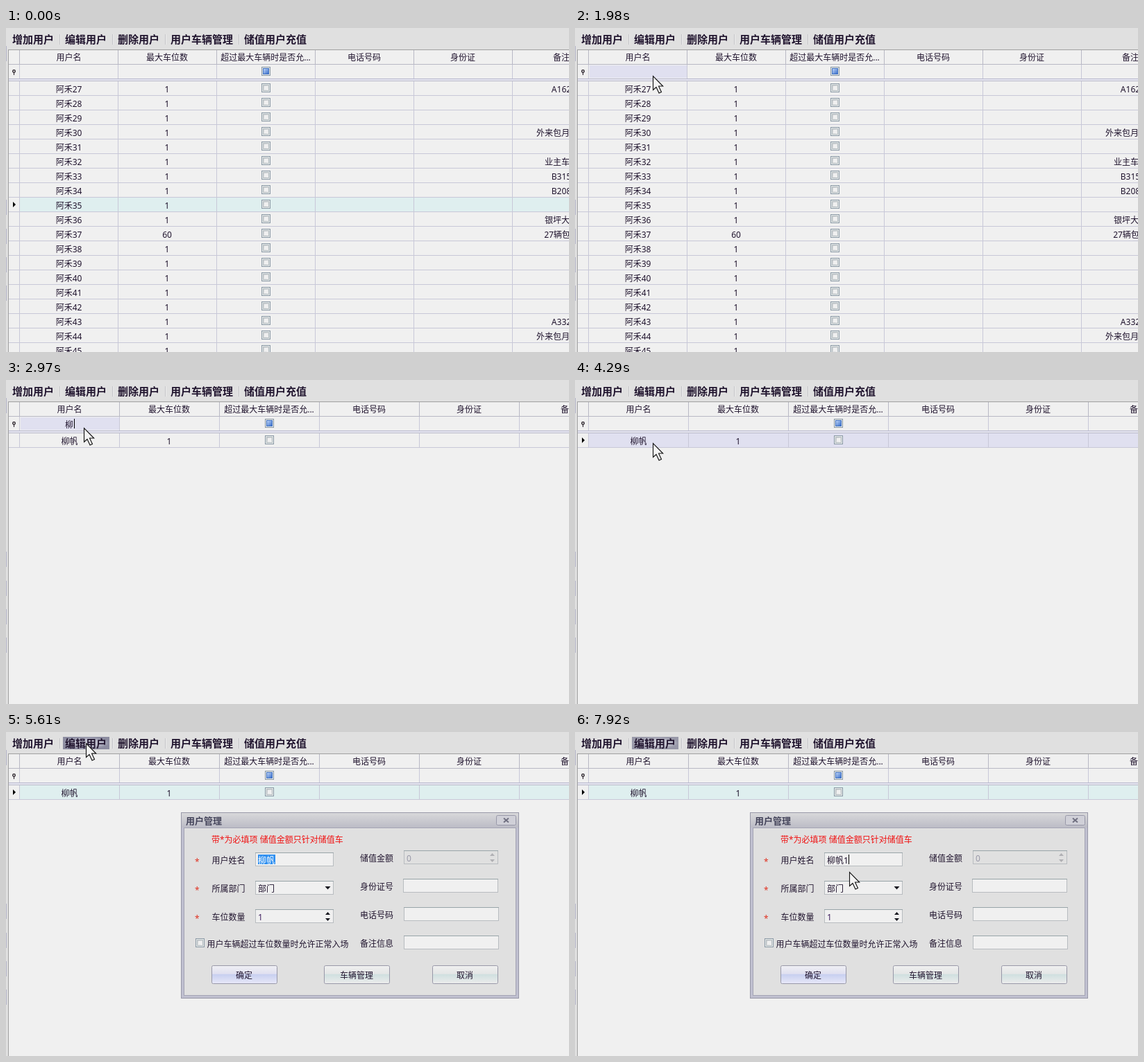
Recreate the animation shown at these times as an HTML page. Size 811 by 468 pixels, loop 8000 ms.

```html
<!DOCTYPE html>
<html lang="zh-CN">
<head>
<meta charset="utf-8">
<style>
html, body { margin: 0; width: 100%; height: 100%; overflow: hidden; background: #f0f0f0; }
svg { display: block; width: 811px; height: 468px; }
text { font: 12px "Noto Sans", "Noto Sans CJK SC", "Noto Sans CJK", sans-serif; fill: #20142e; white-space: pre; }
rect { shape-rendering: crispEdges; }
.tool { font-size: 15px; font-weight: bold; }
.title { font-size: 13px; font-weight: bold; fill: #44445a; }
.ime { font-family: "Liberation Mono", "Noto Serif CJK SC", "Noto Sans CJK SC", monospace; font-size: 16px; }
.code { font: bold 13px "Liberation Sans", sans-serif; fill: #000; }
</style>
</head>
<body>
<svg viewBox="0 0 811 468">
<defs>
  <linearGradient id="blue" x2="1" y2="1"><stop stop-color="#c8dcfc"/><stop offset="1" stop-color="#3068c8"/></linearGradient>
  <linearGradient id="box" x2="1" y2="1"><stop stop-color="#c4c8cc"/><stop offset="1" stop-color="#f4f4f4"/></linearGradient>
  <linearGradient id="bar" x2="0" y2="1"><stop stop-color="#d8d8da"/><stop offset="1" stop-color="#bcbcc6"/></linearGradient>
  <linearGradient id="ok" x2="0" y2="1"><stop stop-color="#f0f0f4"/><stop offset=".45" stop-color="#e0e0f0"/><stop offset=".5" stop-color="#c8d0f0"/><stop offset="1" stop-color="#e8e8f8"/></linearGradient>
  <linearGradient id="plain" x2="0" y2="1"><stop stop-color="#f0f0f0"/><stop offset=".45" stop-color="#e4e6e6"/><stop offset=".5" stop-color="#d0e0e0"/><stop offset="1" stop-color="#ececec"/></linearGradient>
  <radialGradient id="hover"><stop stop-color="#eaeaf8"/><stop offset=".6" stop-color="#d8dcf2"/><stop offset="1" stop-color="#c0c8ea"/></radialGradient>
  <radialGradient id="press"><stop stop-color="#d0d0da"/><stop offset=".6" stop-color="#b8b8c8"/><stop offset="1" stop-color="#8c8ca0"/></radialGradient>
  <radialGradient id="held"><stop stop-color="#d8d8e0"/><stop offset=".6" stop-color="#c0c0cc"/><stop offset="1" stop-color="#9898a8"/></radialGradient>
</defs>
<g id="scene"></g>
</svg>
<script>
const LOOP = 8000, TICK = 330;
const USER = '阿禾', FOUND = '柳帆', QUERY = '柳';
const LILAC = '#e0e0f0', TEAL = '#dfefef', LINE = '#c8c8d8', PALE = '#f0f0f0';
const scene = document.getElementById('scene');

const rect = (x, y, w, h, fill, extra = '') =>
  `<rect x="${x}" y="${y}" width="${w}" height="${h}" fill="${fill}" ${extra}/>`;
const frameBox = (x, y, w, h, fill, stroke, rx = 0) =>
  `<rect x="${x + .5}" y="${y + .5}" width="${w - 1}" height="${h - 1}" rx="${rx}" fill="${fill}" stroke="${stroke}" ${rx ? 'style="shape-rendering:auto"' : ''}/>`;
// y is the vertical middle of the line of text
const text = (x, y, s, extra = '') => `<text x="${x}" y="${y + 4.5}" ${extra}>${s}</text>`;
const mid = (x, y, s, extra = '') => text(x, y, s, 'text-anchor="middle" ' + extra);
const shape = (d, fill) => `<path d="${d}" fill="${fill}"/>`;
const caret = (x, y) => rect(x, y, 1, 14, '#000');

function checkbox(x, y, on) {
  return frameBox(x, y, 13, 13, '#e8ecec', '#8a98a4') +
    frameBox(x + 2, y + 2, 9, 9, on ? 'url(#blue)' : 'url(#box)', on ? '#4070c0' : '#b4bcc0') +
    (on ? '' : rect(x + 4, y + 4, 5, 5, PALE));
}

const TOOLS = [[9, '增加用户'], [85, '编辑用户'], [161, '删除用户'], [237, '用户车辆管理'], [343, '储值用户充值']];

function toolbar(look) {
  let s = rect(0, 0, 811, 31, '#e0e0e0') + rect(0, 31, 3, 437, '#e0e0e0');
  for (const x of [77, 153, 229, 335]) s += rect(x, 9, 1, 15, '#c4c4c8') + rect(x + 1, 9, 1, 15, '#ececec');
  for (const y of [26, 248, 290, 331, 372]) s += rect(0, y, 1, 22, '#b4b4c8');
  if (look) s += rect(82, 7, 67, 18, `url(#${look})`);
  for (const [x, name] of TOOLS) s += text(x, 17, name, 'class="tool"');
  return s;
}

const HEADS = ['用户名', '最大车位数', '超过最大车辆时是否允...', '电话号码', '身份证', '备注'];
const NOTES = { 27: 'A162', 30: '外来包月车辆', 32: '业主车辆', 33: 'B315', 34: 'B208',
  36: '银坪大厦', 37: '27辆包月', 43: 'A332', 44: '外来包月车辆' };

// rows: [name, spaces, note]; active: index of the marked row or -1
function grid(width, rows, active, tint, filterOn) {
  const bottom = Math.min(468, 76 + rows.length * 21);
  const left = i => 19 + i * width;
  const centre = i => left(i) + width / 2 + (i ? 0 : .5);
  const tick = Math.floor(left(2) + width / 2) - 6;
  let s = rect(3, 31, 808, 437, PALE);
  if (filterOn) s += rect(21, 54, width - 2, 18, LILAC);
  if (active >= 0) s += rect(20, 77 + active * 21, 791, 20, tint);
  for (let i = 0; i < 6; i++) {
    s += rect(left(i), 32, 1, 20, '#b8b8c4') + rect(left(i), 53, 1, bottom - 53, LINE);
    s += mid(centre(i), 42, HEADS[i]);
  }
  s += rect(4, 52, 807, 1, '#b8b8c4') + rect(4, 73, 807, 1, '#b4b4cc') +
    rect(4, 74, 807, 2, '#e8e8f2') + rect(4, 76, 807, 1, '#b8b8c8');
  s += checkbox(tick, 56, true);
  s += '<circle cx="11.5" cy="62.5" r="1.8" fill="none" stroke="#201820" stroke-width="1.3"/>' + rect(11, 64, 1, 4, '#201820');
  rows.forEach(([name, count, note], i) => {
    const y = 87 + i * 21;
    s += rect(4, y + 10, 807, 1, LINE) + mid(centre(0), y + 1, name) +
      mid(centre(1), y + 1, count) + checkbox(tick, y - 7, false);
    if (note) s += mid(centre(5), y + 1, note);
  });
  if (active >= 0) s += shape(`M10 ${83 + active * 21}l4 4l-4 4z`, '#000');
  return s + rect(3, 31, 808, 1, '#a0a0a0') + rect(3, 31, 1, 437, '#a0a0a0');
}

const allRows = Array.from({ length: 19 }, (_, i) => {
  const n = 27 + i;
  return [USER + n, n === 37 ? 60 : 1, NOTES[n]];
});
const foundRows = [[FOUND, 1]];

function imePopup(code, words, right) {
  let x = 104;
  let s = frameBox(94, 71, right - 94, 56, PALE, '#c0c0c4') + rect(95, 116, right - 96, 10, '#e0e0e0') +
    rect(94, 126, right - 94, 1, '#a8a8a8') + rect(right - 1, 72, 1, 55, '#b0b0b0') +
    rect(104, 100, right - 116, 1, '#a8a8a8') + text(104, 88, code, 'class="code"');
  s += shape(`M${right - 24} 84v9l-5-4.5z`, '#c8c8c8') + shape(`M${right - 18} 84v9l5-4.5z`, '#909090');
  words.forEach((word, i) => {
    const label = `${i + 1}.${word}`;
    const wide = label.replace(/[ -~]/g, '').length;
    const parts = label.replace(/[ -~]+/g, m => `<tspan font-size="13.33">${m}</tspan>`);
    const color = i ? '#1c2850' : '#c02818';
    s += `<text class="ime" x="${x}" y="119" style="fill:${color}">${parts.replace(/font-size="([\d.]+)"/g, 'style="font-size:$1px"')}</text>`;
    x += 8 * (label.length + wide) + 10;
  });
  return s;
}

const spin = (x, y, color) =>
  shape(`M${x - 3.5} ${y + 4}h7l-3.5-4z`, color) + shape(`M${x - 3.5} ${y + 9}h7l-3.5 4z`, color);

function dialog(stage) {
  const field = (x, y, w, fill = PALE) =>
    frameBox(x, y, w, 20, fill, '#b8bcc0') + rect(x, y, w, 1, '#98a4a8');
  const button = (x, name, look) =>
    frameBox(x, 337, 95, 27, `url(#${look})`, '#9898a8', 2) + mid(x + 47, 351, name);
  let s = frameBox(252, 116, 487, 269, '#c0c0d0', '#9898a8') + rect(253, 117, 485, 21, 'url(#bar)') +
    frameBox(256, 138, 479, 243, '#e0e0e0', '#a4a4b4') + text(259, 128.5, '用户管理', 'class="title"');
  s += frameBox(706, 120, 29, 15, '#d0d0d8', '#9898a8', 2) +
    '<path d="M717 124.5l7 6m0-6l-7 6" stroke="#707080" stroke-width="2" fill="none"/>';
  s += text(296, 155, '带*为必填项 储值金额只针对储值车', 'style="fill:#f01010"');
  ['用户姓名', '所属部门', '车位数量'].forEach((name, i) => {
    const y = 185 + i * 41;
    s += text(272, y + 2, '*', 'style="fill:#e03020"') + text(296.5, y, name) + field(359, y - 11, 113);
  });
  ['储值金额', '身份证号', '电话号码', '备注信息'].forEach((name, i) => {
    const y = 182 + i * 41;
    s += text(510, y, name) + field(i === 1 ? 572 : 573, y - 11, i < 1 ? 136 : 137, i ? PALE : '#e0e0e0');
  });
  s += text(577, 182, '0', 'style="fill:#9898a8"') + spin(700.5, 175, '#b0b0b4');
  s += text(363, 226, '部门') + text(363, 267, '1', 'style="fill:#402060"') +
    shape('M459.5 223h8l-4 4.5z', '#181820') + spin(463.5, 260, '#181820');
  s += checkbox(273, 298, false) + text(289.5, 306, '用户车辆超过车位数量时允许正常入场');
  s += button(296, '确定', 'ok') + button(458, '车辆管理', 'plain') + button(614, '取消', 'plain');
  if (stage === 'selected') s += rect(363, 177, 25, 14, '#3090f0') + text(363, 185, FOUND, 'style="fill:#fff"');
  if (stage === 'caret') s += text(363, 185, FOUND) + caret(387, 177);
  if (stage === 'typed') s += text(363, 185, FOUND + '1') + caret(394, 177);
  return s;
}

// [tick, x, y]: the pointer jumps to each place
const POINTER = [[1, 365, 270], [2, 123, 131], [3, 114, 83], [4, 112, 69], [12, 112, 91], [14, 112, 92],
  [15, 117, 39], [16, 115, 16], [18, 115, 17], [19, 318, 166], [20, 376, 185], [21, 395, 187], [24, 395, 202]];

function pointer(tick) {
  const spot = POINTER.filter(p => p[0] <= tick).pop();
  if (!spot) return '';
  return `<path transform="translate(${spot[1] + .5} ${spot[2] + .5})" d="M0 0V20L4.5 16L8.5 24.5L12 23L8 14.5H14.2Z" fill="#f4f4f4" stroke="#101010" stroke-width="1.1"/>`;
}

function draw(tick) {
  const look = tick < 16 ? '' : tick < 17 ? 'hover' : tick < 18 ? 'press' : 'held';
  let s = toolbar(look);
  if (tick < 9) {
    s += grid(142, allRows, tick < 5 ? 8 : -1, TEAL, tick >= 5);
    if (tick === 5 || tick === 8) s += caret(91, 56);
    if (tick === 7) s += imePopup('s', ['木', '本来a', '想法c', '村b', '杯子aa'], 430);
    if (tick === 8) s += imePopup('sb', [QUERY, FOUND + 'rr', '椭圆lk', '椰b', '椰子bb'], 446);
  } else {
    const typing = tick < 13;
    s += grid(144, foundRows, typing ? -1 : 0, tick < 17 ? LILAC : TEAL, typing);
    if (typing) s += mid(91, 64, QUERY);
    if (tick === 9) s += caret(98, 56);
  }
  if (tick >= 17) s += dialog(tick < 21 ? 'selected' : tick < 22 ? 'caret' : 'typed');
  return s + pointer(tick);
}

let shown = -1;
function update() {
  const tick = Math.floor(performance.now() % LOOP / TICK);
  if (tick !== shown) scene.innerHTML = draw(shown = tick);
  requestAnimationFrame(update);
}
update();
</script>
</body>
</html>
```
